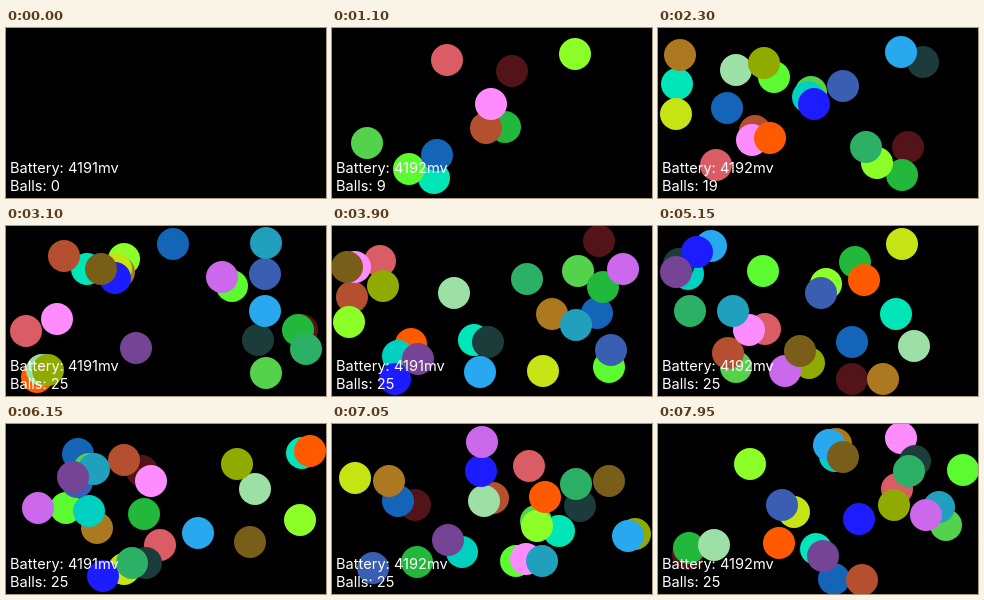
An HTML page with a canvas for the animation above (8 s loop, 320 by 170 pixels).

```html
<!DOCTYPE html>
<html lang="en">
<head>
<meta charset="utf-8">
<title>Bouncing balls</title>
<style>
  html, body { margin: 0; width: 100%; height: 100%; overflow: hidden; background: #000; }
  canvas { display: block; }
</style>
</head>
<body>
<canvas id="stage" width="320" height="170"></canvas>
<script>
const WIDTH = 320, HEIGHT = 170, RADIUS = 16;
const STEP_MS = 50, STEPS = 160;
const REFERENCE_STEP = 103;
const BIRTH_INTERVAL = 2.25, FIRST_BIRTH = 1, COUNTER_LAG = 2.6;
const BATTERY_CHANGES = [11, 62, 90, 113, 141];

// colour, then position at REFERENCE_STEP and velocity in pixels per step
const balls = [
  ['#521418', 194, 153, -2.92, 5.58],
  ['#00e6b8', 238, 88, 3.84, -4.38],
  ['#5cfa30', 105, 45, -6.88, -5.04],
  ['#1464b8', 194, 116, -6.12, -4.32],
  ['#55d24b', 78, 141, -6.7, 6.34],
  ['#22b83c', 197, 36, -2.96, 2.68],
  ['#b45030', 70, 127, 2.39, -4.53],
  ['#da5c64', 107, 103, 2.36, 4.36],
  ['#ff8cff', 91, 104, 2.72, -6.7],
  ['#8cff28', 168, 58, 6.3, -6.34],
  ['#ff5a00', 206, 54, 5.08, -2.55],
  ['#ac7820', 225, 153, -6.7, 2.62],
  ['#00d0c0', 30, 48, 2.63, -5.35],
  ['#c6e414', 244, 18, -6.3, 6.33],
  ['#9ce0a6', 256, 120, 5.36, 6.36],
  ['#90aa00', 151, 137, 4, 6.79],
  ['#1c3c3c', 21, 38, 5.97, 5.04],
  ['#3a5eb2', 163, 67, -4.62, -4.8],
  ['#28a8ee', 53, 20, 6.95, -5.04],
  ['#1c1cff', 39, 26, 2.89, 6.31],
  ['#2cb066', 32, 85, -6.53, 4.36],
  ['#20a0bc', 75, 85, -6.77, -5.1],
  ['#cc68ec', 127, 145, -6.57, 4.07],
  ['#785e18', 142, 125, 5.08, 3.37],
  ['#764494', 18, 46, -2.73, -3.48]
];

const ctx = document.getElementById('stage').getContext('2d');

// Balls turn back slightly past the wall, further when faster.
function bounce(start, velocity, steps, size) {
  const overshoot = 0.35 * Math.abs(velocity);
  const low = RADIUS - overshoot;
  const span = size - 2 * low;
  const period = 2 * span;
  const travel = start + velocity * steps - low;
  const phase = ((travel % period) + period) % period;
  return Math.round(low + (phase > span ? period - phase : phase));
}

function bornBy(step) {
  const count = Math.floor((step - FIRST_BIRTH) / BIRTH_INTERVAL) + 1;
  return Math.max(0, Math.min(balls.length, count));
}

function drawBall([color, x, y, vx, vy], step) {
  const elapsed = step - REFERENCE_STEP;
  ctx.fillStyle = color;
  ctx.beginPath();
  ctx.arc(bounce(x, vx, elapsed, WIDTH), bounce(y, vy, elapsed, HEIGHT), RADIUS, 0, 2 * Math.PI);
  ctx.fill();
}

function drawLabels(step) {
  const changes = BATTERY_CHANGES.filter(change => step >= change).length;
  ctx.fillStyle = '#fff';
  ctx.font = '14.6px Inter, "Noto Sans", sans-serif';
  ctx.fillText(`Battery: ${4191 + changes % 2}mv`, 4, 145);
  ctx.fillText(`Balls: ${bornBy(step - COUNTER_LAG)}`, 4, 163);
}

function render(now) {
  const step = Math.floor(now / STEP_MS) % STEPS;
  ctx.fillStyle = '#000';
  ctx.fillRect(0, 0, WIDTH, HEIGHT);
  balls.slice(0, bornBy(step)).forEach(ball => drawBall(ball, step));
  drawLabels(step);
}

let startTime;
function tick(now) {
  startTime ??= now;
  render(now - startTime);
  requestAnimationFrame(tick);
}
render(0);
requestAnimationFrame(tick);
</script>
</body>
</html>
```
